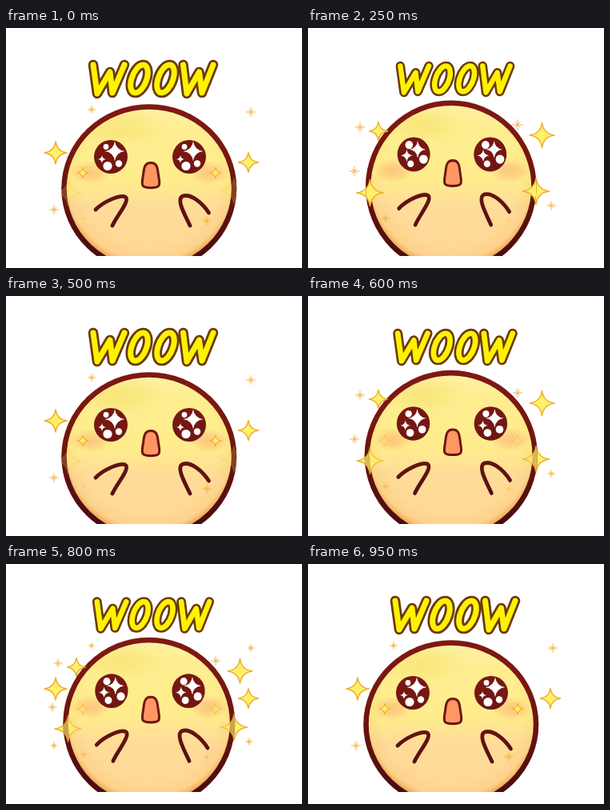
Write an HTML page with a canvas that moves like this. It is 370x300 px and loops after 1000 ms.

```html
<!DOCTYPE html>
<html lang="en">
<head>
<meta charset="utf-8">
<title>Woow</title>
<style>
html, body { margin: 0; width: 100%; height: 100%; overflow: hidden; background: #fff; }
canvas { display: block; }
</style>
</head>
<body>
<canvas id="stage" width="370" height="300" role="img" aria-label="WOOW"></canvas>
<script>
const ctx = document.getElementById('stage').getContext('2d');
const FLOOR = 285;
const STEP = 50;

// Opacity of each sparkle group through one 500 ms beat
const FADE_A = [1, .65, .35, .1, 0, .15, .5, .8, 1, 1];
const FADE_B = [.2, .5, .75, 1, 1, 1, .65, .35, .1, 0];

// x, y, radius
const STARS_A = [[62, 156, 14], [303, 168, 12.5], [96, 181, 7], [262, 181, 7]];
const STARS_B = [[88, 129, 11.5], [292.5, 134, 15.5], [77.5, 206, 16.5], [285, 204, 16.5]];
const GLINTS_A = [[107, 102, 4.5], [306, 105, 5.5], [60, 227, 5.5], [251, 241, 5.5]];
const GLINTS_B = [[65, 124, 6], [262, 121, 6.5], [58, 179, 6], [304, 222, 5], [97, 238, 5]];

const mix = (a, b, t) => a + (b - a) * t;

const body = new Path2D();
body.ellipse(178.8, 200.5, 109.5, 105.3, 0, 0, Math.PI * 2);

const arms = new Path2D(
  'M112 227C122 217 142 208 149 211C156 215 139 234 133 247' +
  'M253.5 231C245 218 231 207 221 210C212 214 224 234 230 247');
const mouth = new Path2D(
  'M181 168.5C187 168.5 189 172 190 180C191 189 193 194 191 197' +
  'C189 200.5 173 200.5 171 197C169 194 171 189 172 180C173 172 175 168.5 181 168.5Z');
const letters = new Path2D(
  'M109 46L114 82L130 55L133 81L148 46' +
  'M221.5 46L226 82L241.5 55L245 81L259 46');
for (const x of [166.5, 199.5]) {
  const ring = new Path2D();
  ring.ellipse(0, 0, 9.6, 17.5, 0, 0, Math.PI * 2);
  letters.addPath(ring, new DOMMatrix([1, 0, -.28, 1, x, 63.5]));
}

// Outline colour, redder at the top and darker below
const ink = ctx.createLinearGradient(0, 95, 0, FLOOR);
ink.addColorStop(0, '#7f1814');
ink.addColorStop(.35, '#761712');
ink.addColorStop(1, '#480d12');

const skin = ctx.createLinearGradient(0, 96, 0, FLOOR);
skin.addColorStop(0, '#fff0a4');
skin.addColorStop(.18, '#feee90');
skin.addColorStop(.5, '#ffec8c');
skin.addColorStop(.68, '#fedc98');
skin.addColorStop(1, '#ffd896');

const rim = ctx.createRadialGradient(179, 186, 86, 179, 186, 116);
rim.addColorStop(0, 'rgba(240,160,60,0)');
rim.addColorStop(.6, 'rgba(240,160,60,.12)');
rim.addColorStop(1, 'rgba(220,120,35,.85)');

function disc(x, y, r, color) {
  ctx.fillStyle = color;
  ctx.beginPath();
  ctx.arc(x, y, r, 0, Math.PI * 2);
  ctx.fill();
}

function starPath(x, y, r) {
  const k = r * .12;
  ctx.beginPath();
  ctx.moveTo(x, y - r);
  ctx.quadraticCurveTo(x + k, y - k, x + r, y);
  ctx.quadraticCurveTo(x + k, y + k, x, y + r);
  ctx.quadraticCurveTo(x - k, y + k, x - r, y);
  ctx.quadraticCurveTo(x - k, y - k, x, y - r);
  ctx.closePath();
}

function whiteStar(x, y, r) {
  starPath(x, y, r);
  ctx.fillStyle = '#fff';
  ctx.fill();
}

function glow(x, y, rx, ry, rgb, alpha) {
  const g = ctx.createRadialGradient(0, 0, 0, 0, 0, 1);
  g.addColorStop(0, `rgba(${rgb},${alpha})`);
  g.addColorStop(.45, `rgba(${rgb},${alpha * .75})`);
  g.addColorStop(1, `rgba(${rgb},0)`);
  ctx.save();
  ctx.translate(x, y);
  ctx.scale(rx, ry);
  ctx.fillStyle = g;
  ctx.fillRect(-1, -1, 2, 2);
  ctx.restore();
}

function eye(x, p) {
  disc(x, 161, 21, ink);
  disc(x - 6, mix(148.5, 149.5, p), mix(3.4, 5, p), '#fff');
  disc(x + mix(10, 12.5, p), mix(169.5, 167, p), mix(4.2, 5.5, p), '#fff');
  disc(x - 4, 172.5, mix(5.6, 4.2, p), '#fff');
  whiteStar(x + 5, mix(154, 155, p), mix(12.5, 10.5, p));
  whiteStar(x - mix(11, 9, p), mix(164, 162.5, p), mix(5, 7.5, p));
}

function squash(p) {
  ctx.translate(179, FLOOR);
  ctx.scale(mix(1, .975, p), mix(1, 1.025, p));
  ctx.translate(-179, -FLOOR);
}

function drawFace(p) {
  ctx.save();
  squash(p);
  ctx.fillStyle = skin;
  ctx.fill(body);

  ctx.save();
  ctx.clip(body);
  glow(142, 124, 55, 24, '238,216,80', .35);
  ctx.fillStyle = rim;
  ctx.fillRect(60, 90, 240, 200);
  glow(105, 181, 25, 15, '250,170,115', .55);
  glow(254, 181, 25, 15, '250,170,115', .55);
  ctx.restore();

  // Opaque edge lies just inside the body
  ctx.save();
  ctx.clip(body);
  ctx.strokeStyle = ink;
  ctx.lineWidth = 13;
  ctx.stroke(body);
  ctx.restore();

  eye(131, p);
  eye(229, p);

  ctx.strokeStyle = ink;
  ctx.fillStyle = '#ff9763';
  ctx.fill(mouth);
  ctx.lineWidth = 3;
  ctx.stroke(mouth);
  ctx.lineWidth = 4.8;
  ctx.stroke(arms);
  ctx.restore();
}

function drawWord(p) {
  const s = mix(1, .915, p);
  ctx.save();
  ctx.translate(184, 64);
  ctx.scale(s, s);
  ctx.translate(-184, -64);
  for (const [color, width] of [['#6b3a10', 12.6], ['#fff200', 7]]) {
    ctx.strokeStyle = color;
    ctx.lineWidth = width;
    ctx.stroke(letters);
  }
  ctx.restore();
}

function drawSparkles(stars, glints, alpha) {
  ctx.strokeStyle = '#f0b030';
  ctx.fillStyle = '#fff06a';
  for (const [x, y, r] of stars) {
    starPath(x, y, r);
    ctx.lineWidth = r > 10 ? 1.6 : 1.2;
    ctx.fill();
    ctx.stroke();
  }
  ctx.strokeStyle = '#f4b248';
  ctx.lineWidth = 1;
  for (const [x, y, r] of glints) {
    ctx.beginPath();
    for (let i = 0; i < 8; i++) {
      const a = i * Math.PI / 4;
      const len = r * (i % 2 ? .65 : 1) * mix(.5, 1, alpha);
      ctx.moveTo(x, y);
      ctx.lineTo(x + Math.cos(a) * len, y + Math.sin(a) * len);
    }
    ctx.stroke();
  }
}

function draw(now) {
  const k = Math.floor(now / STEP) % 10;
  const p = Math.min(k, 9 - k) / 4;
  const groups = [[STARS_A, GLINTS_A, FADE_A[k]], [STARS_B, GLINTS_B, FADE_B[k]]];

  ctx.fillStyle = '#fff';
  ctx.fillRect(0, 0, 370, 300);
  ctx.save();
  ctx.beginPath();
  ctx.rect(0, 0, 370, FLOOR);
  ctx.clip();
  ctx.lineCap = ctx.lineJoin = 'round';

  // Beside the face sparkles are solid or absent; on it they fade
  for (const g of groups) if (g[2] >= .5) drawSparkles(...g);
  drawFace(p);
  ctx.save();
  const base = ctx.getTransform();
  squash(p);
  ctx.clip(body);
  ctx.setTransform(base);
  for (const g of groups) {
    ctx.globalAlpha = g[2];
    drawSparkles(...g);
  }
  ctx.restore();

  drawWord(p);
  ctx.restore();
}

let start;
function tick(now) {
  start ??= now;
  draw(now - start);
  requestAnimationFrame(tick);
}
draw(0);
requestAnimationFrame(tick);
</script>
</body>
</html>
```
